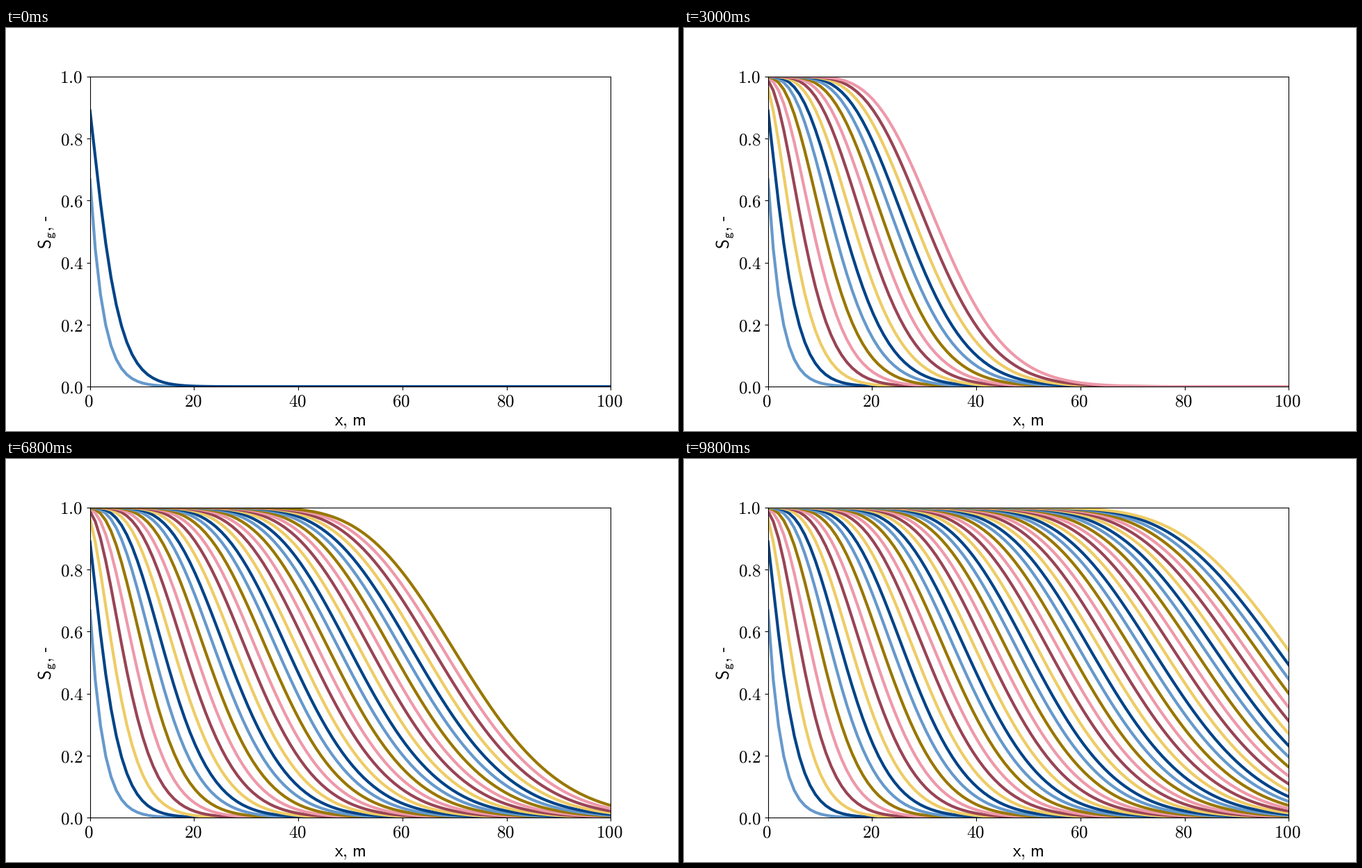
These frames come from a looping animation (966x580 px, 10000 ms). A matplotlib script:

```python
import numpy as np
import matplotlib.pyplot as plt
from matplotlib.animation import FuncAnimation
from matplotlib.transforms import IdentityTransform

W, H, DPI = 966, 580, 100
FRAMES, INTERVAL = 50, 200
CELLS, COURANT = 100, 2.0
COLORS = ["#6699CC", "#004488", "#EECC66", "#994455", "#EE99AA", "#997700"]

plt.rcParams.update({
    "font.family": "Liberation Sans",
    "font.size": 18,
    "mathtext.fontset": "cm",
})


def step(s):
    """One implicit upwind step with gas saturation 1 at the inlet."""
    new = np.empty_like(s)
    left = 1.0
    for i, old in enumerate(s):
        left = (old + COURANT * left) / (1 + COURANT)
        new[i] = left
    return new


fig, ax = plt.subplots(figsize=(W / DPI, H / DPI), dpi=DPI)
fig.subplots_adjust(left=0.125, right=0.9, bottom=0.11, top=0.88)
ax.set(xlim=(0, 100), ylim=(0, 1),
       xticks=np.arange(0, 101, 20), yticks=np.linspace(0, 1, 6))
ax.tick_params(labelleft=False, labelbottom=False)


def put(x, y, text, **kw):
    """Place text by its baseline, in pixels from the top left."""
    fig.text(x, H - y, text, va="baseline", transform=IdentityTransform(), **kw)


def sans(text):
    return rf"$\mathsf{{{text}}}$"


x0, x1 = 0.125 * W, 0.9 * W
y0, y1 = 0.89 * H, 0.12 * H

for v in range(0, 101, 20):
    nudge = 2.3 if v == 100 else 1.5
    put(x0 + (x1 - x0) * v / 100 - nudge, 544.5, sans(v), ha="center")

for k in range(6):
    right = 110 if k == 5 else 111
    put(right, y0 + (y1 - y0) * k / 5 + 9.2, sans(f"{k / 5:.1f}"), ha="right")

put(494.5, 572, sans(r"x{,}\ m"), ha="center")
put(65, 293.5, r"$\mathsf{S_g}{,}$ -", ha="center",
    rotation=90, rotation_mode="anchor")

x = np.linspace(0, 100, CELLS)
s = np.zeros(CELLS)
lines = []
for n in range(FRAMES + 1):
    s = step(s)
    lines += ax.plot(x, s, color=COLORS[n % len(COLORS)], lw=3)


def update(frame):
    for n, line in enumerate(lines):
        line.set_visible(n < frame + 2)
    return lines


anim = FuncAnimation(fig, update, frames=FRAMES, interval=INTERVAL,
                     init_func=lambda: update(0), repeat=True,
                     repeat_delay=0, blit=False)
plt.show()
```
